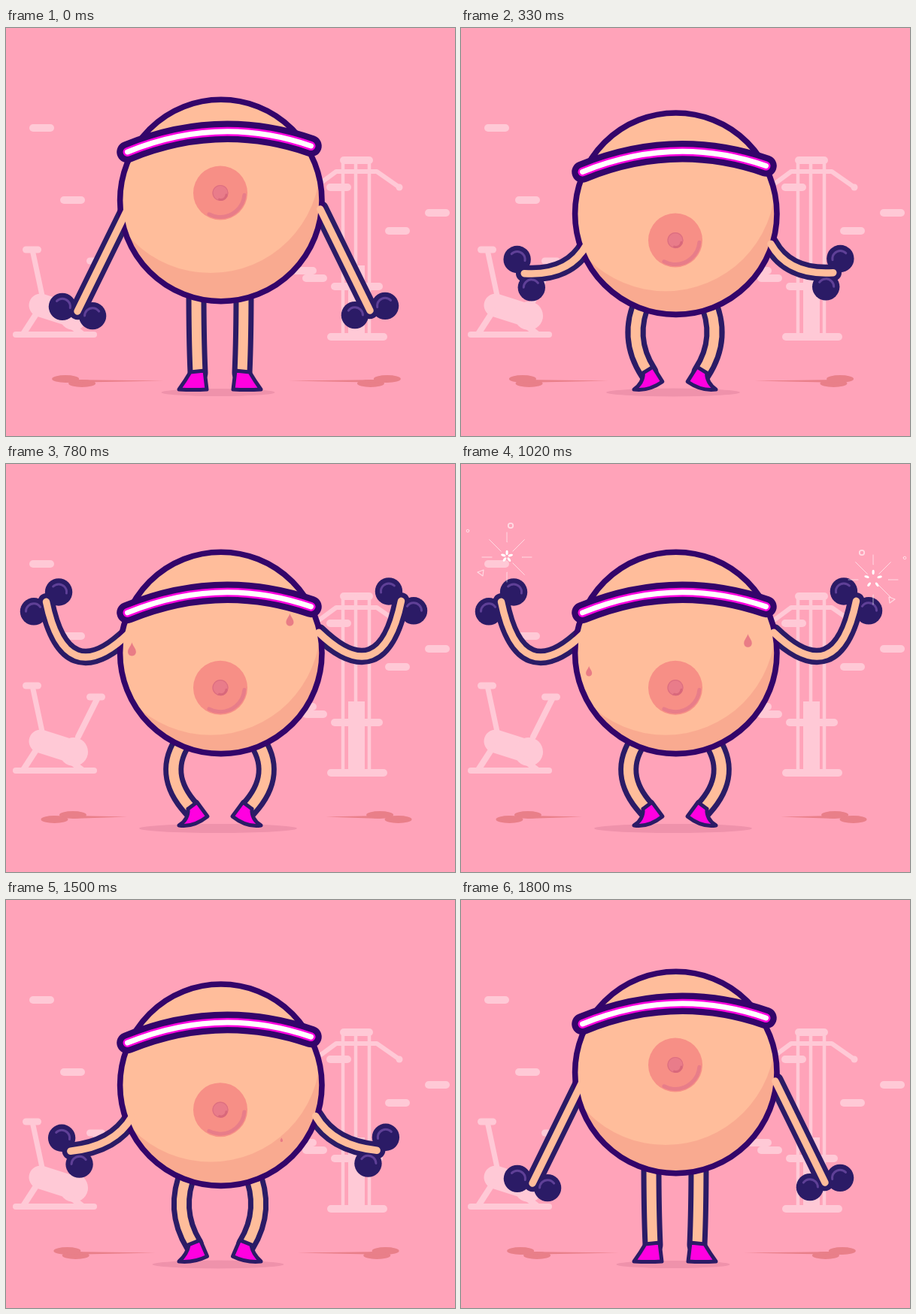
Animation, 597 px wide and 543 px high, one loop 1830 ms. Source, as an HTML page with a canvas:

```html
<!DOCTYPE html>
<html lang="en">
<head>
<meta charset="utf-8">
<title>Workout</title>
<style>
html, body { margin: 0; width: 100%; height: 100%; overflow: hidden; background: #ffa3b9; }
canvas { display: block; }
</style>
</head>
<body>
<canvas id="stage" width="597" height="543"></canvas>
<script>
const ctx = document.getElementById('stage').getContext('2d');
const LOOP = 1830, STEP = 30, PEAK = 900, TAU = Math.PI * 2, RAD = Math.PI / 180;
const INK = '#33056a', NAVY = '#2b1b66', SKIN = '#ffbd9b', SHADE = '#f9aa90',
  PINK = '#ffa3b9', PALE = '#ffc9d6', MAGENTA = '#ff00e0', ROSE = '#e97f89', SWEAT = '#e97c86';
const CX = 285.8, R = 134.2;

const mix = (a, b, k) => a + (b - a) * k;
const clamp = v => Math.min(1, Math.max(0, v));
const smooth = v => v * v * (3 - 2 * v);

// Everything follows from how far the lift is from its peak
function pose(t) {
  const x = clamp(Math.abs(t - PEAK) / PEAK);
  const lift = (1 + Math.cos(Math.PI * x ** 1.15)) / 2;
  const squat = 1 - mix(smooth(x ** 3.5), 1 - lift, .17);
  const bodyY = 229.5 + 22 * squat;
  const rise = lift + .47 * lift ** 6;
  const hand = [95 - 30 * rise, 377 - 140 * rise];
  const sy = 242 + 93 * squat - 79 * rise;
  const shoulder = [CX - Math.sqrt(R * R - (sy - bodyY) ** 2) + 9, sy];
  return {
    squat, bodyY, hand, shoulder,
    sag: 72 * lift ** 1.3,
    angle: (17 + 128 * lift) * RAD,
    bend: mix(squat, lift, .25),
    flex: smooth(clamp((squat - .65) / .2)),
    spread: 75.5 + 30 * mix(squat, lift, .8)
  };
}

function stroke(color, width) {
  ctx.strokeStyle = color;
  ctx.lineWidth = width;
  ctx.stroke();
}
function line(color, width, ...pts) {
  ctx.beginPath();
  pts.forEach(p => ctx.lineTo(...p));
  stroke(color, width);
}
function oval(x, y, rx, ry, color) {
  ctx.beginPath();
  ctx.ellipse(x, y, rx, ry, 0, 0, TAU);
  ctx.fillStyle = color;
  ctx.fill();
}
function arc(x, y, r, from, to, color, width) {
  ctx.beginPath();
  ctx.arc(x, y, r, from * RAD, to * RAD);
  stroke(color, width);
}
const pill = (x, y, length = 33, h = 10) => line(PALE, h, [x + h / 2, y], [x + length - h / 2, y]);

function mirrored(axis, dy, draw) {
  ctx.save();
  ctx.translate(axis, dy);
  ctx.scale(-1, 1);
  draw();
  ctx.restore();
}
function both(axis, dy, draw) {
  draw();
  mirrored(axis, dy, draw);
}

function gym() {
  ctx.fillStyle = PINK;
  ctx.fillRect(0, 0, 597, 543);
  [[31, 133], [72, 229], [426, 212], [557, 246], [504, 270], [380, 323], [394, 333]]
    .forEach(brick => pill(...brick));
  // bike
  pill(22, 295, 25, 9);
  pill(107, 310, 25, 9);
  line(PALE, 7, [35, 295], [48, 356]);
  line(PALE, 8, [122, 311], [96, 363]);
  line(PALE, 31, [46, 369], [93, 384]);
  oval(90, 383, 19, 19, PALE);
  line(PALE, 8, [43, 376], [23, 407]);
  line(PALE, 8, [84, 394], [101, 407]);
  pill(9, 408, 112, 8);
  // cable tower
  pill(444, 176, 44);
  [448, 465, 483].forEach(x => line(PALE, 4.5, [x, 176], [x, 410]));
  line(PALE, 6, [416, 208], [439, 191], [493, 191], [523, 212]);
  oval(523, 212, 4.5, 4.5, PALE);
  ctx.fillStyle = PALE;
  ctx.fillRect(455, 316, 22, 94);
  pill(432, 344, 69);
  pill(427, 411, 80);
}

function weightShadow({ angle }) {
  const c = Math.cos(angle), a = 84.5 - 5.6 * c, b = 81 + 21 * c;
  oval(a, 467, 18, 5, ROSE);
  oval(b, 473, 18, 5, ROSE);
  ctx.beginPath();
  ctx.moveTo(a, 468);
  ctx.lineTo(183 + 28 * c, 469.5);
  ctx.lineTo(a, 472);
  ctx.fill();
}

function leg({ bend, flex }) {
  const b = 50 * bend;
  ctx.beginPath();
  ctx.moveTo(253 - b * .3, 350 + b * .3);
  ctx.quadraticCurveTo(253 - b, 412, 255 - b * .17, 459);
  stroke(NAVY, 27);
  stroke(SKIN, 13);
  // shoe: flat when standing, tipped when squatting
  const p = (x0, y0, x1, y1) => [mix(x0, x1, flex), mix(y0, y1, flex)];
  const ankle = p(245, 458, 242, 459);
  ctx.beginPath();
  ctx.moveTo(...ankle);
  ctx.lineTo(...p(264, 456, 254, 450));
  ctx.lineTo(...p(267, 481, 268, 469));
  ctx.quadraticCurveTo(...p(249, 482, 249, 484), 230, 481);
  ctx.quadraticCurveTo(...p(238, 470, 243, 473), ...ankle);
  ctx.fillStyle = MAGENTA;
  ctx.fill();
  stroke(NAVY, 5);
}

// A curve hanging below the line from shoulder to hand
function arm({ shoulder: [sx, sy], hand: [hx, hy], sag }, color, width) {
  const dx = hx - sx, dy = hy - sy, k = sag / Math.hypot(dx, dy);
  const bow = f => [sx + dx * f + dy * k, sy + dy * f - dx * k];
  ctx.beginPath();
  ctx.moveTo(sx, sy);
  ctx.bezierCurveTo(...bow(.28), ...bow(.62), hx, hy);
  stroke(color, width);
}

function dumbbell({ hand: [x, y], angle }) {
  const dx = 21 * Math.cos(angle), dy = 21 * Math.sin(angle);
  line(NAVY, 12, [x - dx, y - dy], [x + dx, y + dy]);
  [-1, 1].forEach(side => {
    const bx = x + side * dx, by = y + side * dy, turn = -85 - 22 * side;
    oval(bx, by, 18.2, 18.2, NAVY);
    arc(bx, by, 10.5, turn - 72, turn + 72, '#5f4097', 3);
  });
}

// Swells, runs down the skin and drifts with its curve
function drop(t, start, end, [x, y], fall, power, drift, curl) {
  const u = (t - start) / (end - start);
  if (u <= 0 || u >= 1) return;
  const h = 18 * Math.min(1, u * 4, 1.33 * Math.sqrt(1 - u));
  ctx.save();
  ctx.translate(x + drift * u + curl * u ** 4, y + fall * u ** power);
  ctx.scale(h, h);
  ctx.beginPath();
  ctx.moveTo(0, -.5);
  ctx.bezierCurveTo(.08, -.22, .3, -.06, .3, .2);
  ctx.bezierCurveTo(.3, .6, -.3, .6, -.3, .2);
  ctx.bezierCurveTo(-.3, -.06, -.08, -.22, 0, -.5);
  ctx.fillStyle = SWEAT;
  ctx.fill();
  ctx.restore();
}

function body({ squat, bodyY, bend }, t) {
  oval(CX, bodyY, R, R, SHADE);
  ctx.save();
  ctx.clip();
  oval(272, 180 + 35 * bend, 146, 146, SKIN);
  ctx.restore();
  arc(CX, bodyY, R, 0, 360, INK, 7.6);

  const y = 219.5 + 78.5 * squat;
  oval(285, y, 36, 36, '#f78f86');
  arc(285, y, 32, 5, 118, '#e87d89', 5);
  oval(285, y, 10.5, 10.5, '#e97c8a');
  arc(285, y, 10, 0, 360, '#dd6f80', 1.2);
  arc(286, y + 2, 7, 5, 110, '#d9687b', 3);

  drop(t, 400, 1300, [167, 200], 110, 1, 0, 14);
  drop(t, 545, 1560, [372, 194], 138, 1.6, 24, -36);

  const dy = 33 * squat;
  ctx.beginPath();
  ctx.moveTo(161.5, 165 + dy);
  ctx.quadraticCurveTo(284, 115 + dy, 405.5, 157 + dy);
  stroke(INK, 28.5);
  stroke(MAGENTA, 12);
  stroke('#fff', 7);
}

function bits(s, alpha) {
  const far = s ** .6, near = Math.sqrt(Math.min(s, 1));
  const x = 61 - 35 * near, y = 124 + 21 * near;
  ctx.globalAlpha = .6 * alpha;
  arc(61 + 5 * far, 124 - 42 * far, 3.2, 0, 360, '#fff', 1.8);
  arc(61 - 52 * near, 124 - 35 * near, 1.8, 0, 360, '#fff', 1);
  line('#fff', 1.2, [x - 4, y - 1], [x + 4, y - 4], [x + 3, y + 4], [x - 4, y - 1]);
}

function burst(x, y, s, alpha, spread) {
  for (let i = 0; i < 7; i++) {
    const a = Math.PI * (1 + i / 4), c = Math.cos(a), d = Math.sin(a);
    const r0 = (i % 2 ? 11 : 20) * s, r1 = 33 * Math.min(1, Math.sqrt(s));
    ctx.globalAlpha = .6 * alpha;
    if (r1 > r0) line('#fff', 1, [x + r0 * c, y + r0 * d], [x + r1 * c, y + r1 * d]);
  }
  ctx.globalAlpha = alpha;
  for (let i = 0; i < 5; i++) {
    ctx.save();
    ctx.translate(x, y - 1);
    ctx.rotate(i * TAU / 5 - .3);
    oval(spread * s, 0, 3.2 * alpha, 1.6 * alpha, '#fff');
    ctx.restore();
  }
}

function sparks(t) {
  const s = (t - PEAK) / 120, end = 2.3;
  if (s <= 0 || s >= end) return;
  const alpha = Math.min(1, end - s);
  bits(s, alpha);
  mirrored(599, 36, () => bits(s, alpha));
  burst(61, 124, s, alpha, 5);
  burst(548, 154, s, alpha, 9);
  ctx.globalAlpha = 1;
}

function draw(t) {
  const p = pose(t);
  ctx.lineCap = ctx.lineJoin = 'round';
  gym();
  both(586, 0, () => weightShadow(p));
  oval(282, 485, p.spread, 5 + (p.spread - 75) / 30, '#ef92ab');
  both(569, 0, () => leg(p));
  both(579, -1, () => {
    arm(p, NAVY, 22.5);
    dumbbell(p);
  });
  body(p, t);
  both(579, -1, () => arm(p, SKIN, 9.5));
  sparks(t);
}

const start = performance.now();
function tick() {
  const t = (performance.now() - start) % LOOP;
  draw(Math.floor(t / STEP) * STEP);
  requestAnimationFrame(tick);
}
tick();
</script>
</body>
</html>
```
